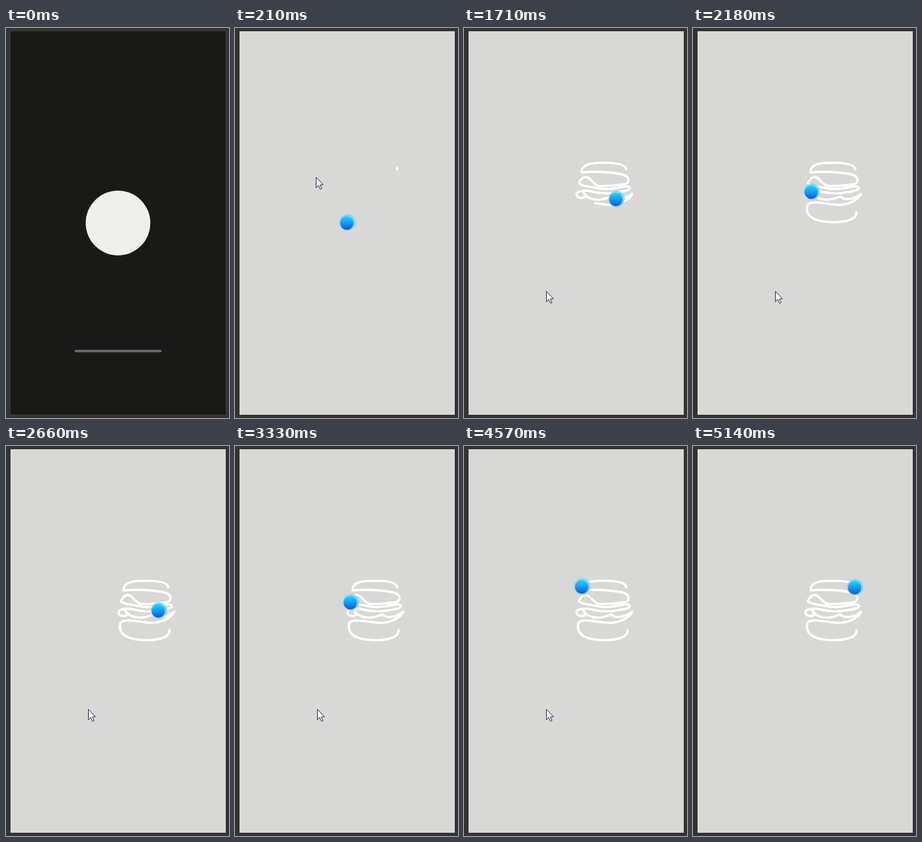
An HTML page for the animation above (5.52 s loop, 345 by 602 pixels).

```html
<!DOCTYPE html>
<html lang="en">
<head>
<meta charset="utf-8">
<title>Line drawing with travelling dot</title>
<style>
  html, body { margin: 0; width: 100%; height: 100%; overflow: hidden; background: #333332; }
  svg { display: block; width: 345px; height: 602px; }
</style>
</head>
<body>
<svg viewBox="0 0 345 602">
  <defs>
    <linearGradient id="core" x2="0" y2="1">
      <stop offset="0" stop-color="#1fd2ff"/>
      <stop offset=".5" stop-color="#129af2"/>
      <stop offset="1" stop-color="#0a5bdc"/>
    </linearGradient>
    <linearGradient id="halo" x2="0" y2="1">
      <stop offset="0" stop-color="#5cd9fa"/>
      <stop offset="1" stop-color="#93c0e6"/>
    </linearGradient>
  </defs>
  <rect width="345" height="602" fill="#333332"/>
  <g id="splash">
    <rect x="6.5" y="4.5" width="334" height="593" fill="#191917" stroke="#41413f"/>
    <circle cx="173.3" cy="301" r="50" fill="#efefee"/>
    <rect x="106" y="496.8" width="135" height="3.6" rx="1.6" fill="#656b6f"/>
  </g>
  <g id="scene">
    <rect x="7" y="5" width="333" height="592" fill="#d8d8d6"/>
    <path id="line" fill="none" stroke="#fff" stroke-width="3.6" stroke-linecap="round" stroke-linejoin="round"/>
    <g id="ball">
      <circle r="12.5" fill="url(#halo)" opacity=".85"/>
      <circle cx="-1" cy=".8" r="10.3" fill="url(#core)"/>
    </g>
    <path id="cursor" d="M.5 .5V16.5L4.2 13 6.8 18.8 9.2 17.8 6.7 12H11.5Z" fill="#fff" stroke="#23264a"/>
  </g>
</svg>
<script>
(() => {
  const LOOP = 5520, SPLASH_END = 100, STEP = 95.1, LAST = 53;
  const [splash, scene, line, ball, cursor] =
    ['splash', 'scene', 'line', 'ball', 'cursor'].map(id => document.getElementById(id));

  // One continuous stroke, cut where the pen or the ball passes at a known time.
  const parts = [
    'M251 218C250 210 235 208 217 208S181 209 182 223C200 221 232 222 248 227',
    'C258 231 255 240 249 241S225 244 209 244C199 242 195 229 188 230S178 238 178 240C183 245 199 245 210 248',
    'C224 250 235 247 246 245S259 248 254 250 242 253 235.5 254',
    'C215 257 203 254 196 252S174 251 174 257 187 264 187 260 182 251 184 252C188 262 198 265 208 265S224 261 228 260C230 262 233 264 237 264',
    'C246 264 255 260 260 256C256 266 240 272 228 273 220 273 213 272 207 271',
    'C198 270 189 268 182 270S176.5 275 176.5 277',
    'C175 289 185 297 205 299S254 299 253 284'
  ];

  let d = '';
  const cuts = [0];
  for (const part of parts) {
    d += part;
    line.setAttribute('d', d);
    cuts.push(line.getTotalLength());
  }
  const [start, bun, lettuce, leaf, wave, base, side, end] = cuts;

  const penKeys = [[190, start], [960, lettuce], [1710, base], [2100, end]];
  const ballKeys = [[210, end], [960, side], [1710, wave], [2660, leaf], [4010, bun], [5140, start]];
  const cursorKeys = [
    [210, 125, 230], [480, 254, 268], [670, 253, 280], [860, 247, 322],
    [1240, 247, 322], [1600, 127, 406]
  ];

  // Linear interpolation in rows of [time, ...values].
  function at(keys, t) {
    const i = keys.findIndex(k => k[0] > t);
    if (i === 0) return keys[0].slice(1);
    if (i < 0) return keys[keys.length - 1].slice(1);
    const a = keys[i - 1], b = keys[i];
    const f = (t - a[0]) / (b[0] - a[0]);
    return a.slice(1).map((v, j) => v + (b[j + 1] - v) * f);
  }

  const show = (el, on) => { el.style.display = on ? '' : 'none'; };
  const move = (el, x, y) => el.setAttribute('transform', `translate(${x} ${y})`);

  function draw(now) {
    const intro = now < SPLASH_END;
    show(splash, intro);
    show(scene, !intro);
    if (intro) return;

    // The picture advances in even steps, like a screen recording.
    const step = Math.min(LAST, Math.floor((now - 90) / STEP));
    const t = SPLASH_END + step * STEP;

    show(line, t >= 190);
    line.setAttribute('stroke-dasharray', `${at(penKeys, t)[0]} 2000`);

    if (t < 250) {
      move(ball, 174, 300.3);
    } else {
      const p = line.getPointAtLength(at(ballKeys, t)[0]);
      move(ball, p.x, p.y);
    }

    const [x, y] = at(cursorKeys, t);
    move(cursor, Math.round(x), Math.round(y));
    show(cursor, step < LAST);
  }

  const t0 = performance.now();
  function tick() {
    draw((performance.now() - t0) % LOOP);
    requestAnimationFrame(tick);
  }
  tick();
})();
</script>
</body>
</html>
```
